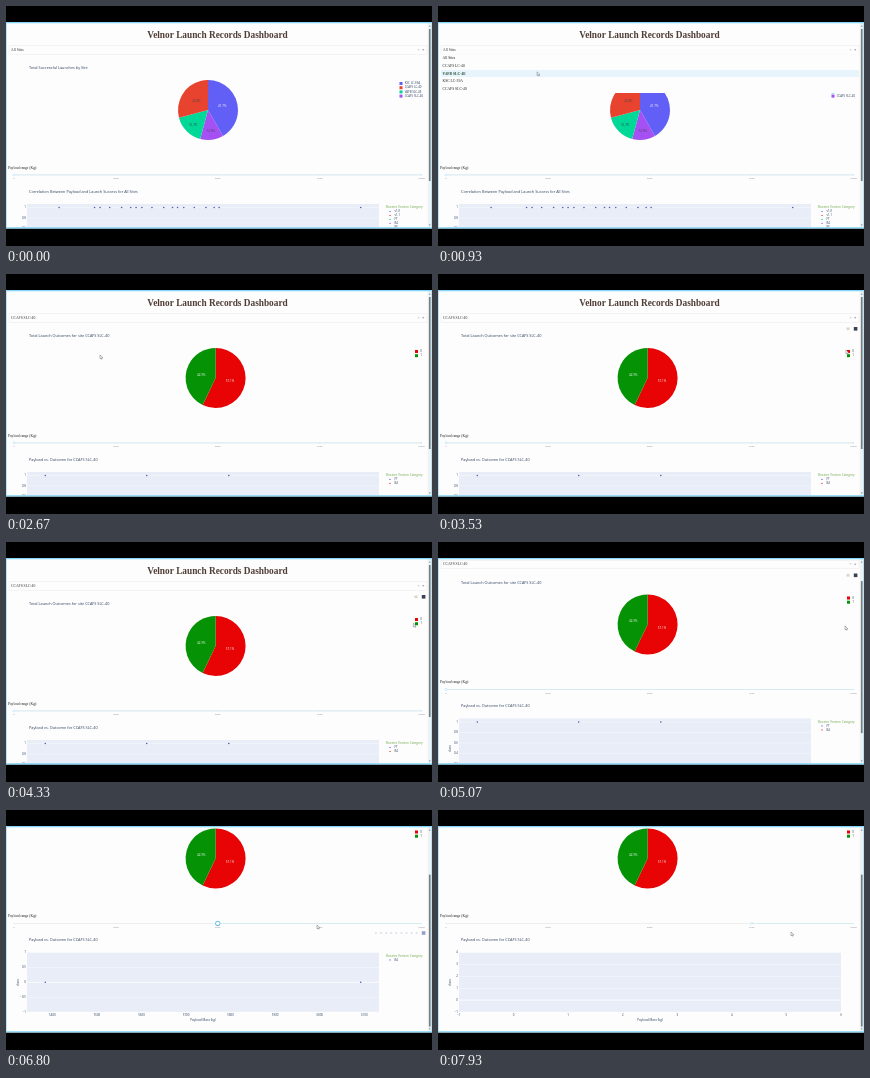
These frames come from a looping animation (426 by 240 pixels, 8 s). An HTML page with a canvas:

```html
<!DOCTYPE html>
<html lang="en">
<head>
<meta charset="utf-8">
<title>Launch Records Dashboard</title>
<style>
html, body { margin: 0; width: 100%; height: 100%; overflow: hidden; background: #000; }
canvas { display: block; width: 100vw; height: 100vh; }
</style>
</head>
<body>
<canvas id="stage"></canvas>
<script>
const W = 426, H = 240, LOOP = 8000;
const canvas = document.getElementById('stage');
const ctx = canvas.getContext('2d');
const SANS = '"Open Sans", sans-serif', SERIF = '"Liberation Serif", serif';
const INK = '#2a3f5f', RED = '#e80404', GREEN = '#059205';
const BLUE = '#625ff6', CORAL = '#e8432f', MINT = '#00d898', PURPLE = '#a450f2';
const PALETTE = [BLUE, CORAL, MINT, PURPLE, '#ffa15a'];
const PLOT = { left: 21, top: 198, bottom: 257.5 };

const SITES = ['All Sites', 'CCAFS LC-40', 'VAFB SLC-4E', 'KSC LC-39A', 'CCAFS SLC-40'];
const BOOSTERS = ['v1.0', 'v1.1', 'FT', 'B4', 'B5'];

// Launches per site: payload, outcome, booster.
const launch = (kg, ok, booster) => ({ kg, ok, booster });
const LAUNCHES = {
  0: [launch(0, 0, 'v1.0'),
    ...Array.from({ length: 16 }, (_, i) => launch(1500 + 255 * i + 90 * Math.sin(i * 5), 1, BOOSTERS[i % 5])),
    launch(420, 1, 'FT'), launch(9600, 1, 'B5')],
  2: [launch(500, 1, 'v1.1'), launch(5000, 0, 'FT'), launch(9600, 1, 'B4')],
  4: [launch(362, 1, 'FT'), launch(2205, 1, 'B4'), launch(2647, 0, 'B4'), launch(3696, 1, 'FT'),
    launch(4230, 0, 'B4'), launch(5384, 0, 'B4'), launch(6092, 0, 'B4')]
};

// Each stop is an arrival time followed by the values reached.
const CURSOR = [
  [0, 230, 62], [500, 118, 45], [950, 100, 68], [1500, 118, 47], [2300, 95, 83], [3200, 409, 78],
  [4500, 408, 86], [5700, 9, 114], [5980, 115, 114], [6480, 212, 115], [6780, 312, 117], [7600, 354, 124]
];
const SCROLL = [[0, 0], [4950, 21.5], [5350, 55.5]];
const MIN_KG = [[0, 0], [5980, 2500], [6480, 5000], [7080, 7500]];

const lastStop = (stops, t) => stops.filter(s => s[0] <= t).pop();

function glide(stops, t, span, col = 1) {
  const from = lastStop(stops, t);
  const to = stops.find(s => s[0] > t);
  if (!to) return from[col];
  const begin = Math.max(from[0], to[0] - span);
  const k = Math.max(0, (t - begin) / (to[0] - begin));
  return from[col] + (to[col] - from[col]) * k * k * (3 - 2 * k);
}

function box(x, y, w, h, color) {
  ctx.fillStyle = color;
  ctx.fillRect(x, y, w, h);
}

function dot(x, y, r, color) {
  ctx.fillStyle = color;
  ctx.beginPath();
  ctx.arc(x, y, r, 0, Math.PI * 2);
  ctx.fill();
}

function triangle(x, y, half, height, color) {
  ctx.fillStyle = color;
  ctx.beginPath();
  ctx.moveTo(x - half, y);
  ctx.lineTo(x + half, y);
  ctx.lineTo(x, y + height);
  ctx.fill();
}

function text(str, x, y, size, { color = INK, font = SANS, align = 'left', weight = '' } = {}) {
  ctx.font = `${weight} ${size}px ${font}`;
  ctx.fillStyle = color;
  ctx.textAlign = align;
  ctx.textBaseline = 'middle';
  ctx.fillText(str, x, y);
}

function pie(cx, cy, r, slices) {
  let a0 = -Math.PI / 2;
  for (const [share, color, ink] of slices) {
    const a1 = a0 + share / 100 * Math.PI * 2;
    ctx.fillStyle = color;
    ctx.beginPath();
    ctx.moveTo(cx, cy);
    ctx.arc(cx, cy, r, a0, a1);
    ctx.fill();
    const mid = (a0 + a1) / 2, d = r * (share < 20 ? 0.7 : 0.49);
    text(share + '%', cx + d * Math.cos(mid), cy + d * Math.sin(mid), 3, { color: ink, align: 'center' });
    a0 = a1;
  }
}

function pieLegend(x, entries) {
  entries.forEach(([name, color], i) => {
    const y = 77.5 + i * 4.2;
    box(x - 1.5, y - 1.5, 3, 3, color);
    text(name, x + 3.7, y, 2.9);
  });
}

function pieChart(site) {
  if (site === 0) {
    text('Total Successful Launches by Site', 23, 62, 3.82);
    pie(202, 104, 30, [[41.7, BLUE, '#fff'], [12.5, PURPLE, '#444'], [16.7, MINT, '#444'], [29.2, CORAL, '#444']]);
    pieLegend(395, [[SITES[3], BLUE], [SITES[1], CORAL], [SITES[2], MINT], [SITES[4], PURPLE]]);
    return;
  }
  const [red, green] = site === 2 ? [60, 40] : [57.1, 42.9];
  text('Total Launch Outcomes for site ' + SITES[site], 23, 62, 3.82);
  pie(209.6, 104, 30, [[red, RED, '#fff'], [green, GREEN, '#fff']]);
  pieLegend(410.5, [['0', RED], ['1', GREEN]]);
}

// Round tick values covering lo..hi with at most `most` intervals.
function ticks(lo, hi, most) {
  const unit = 10 ** Math.floor(Math.log10((hi - lo) / most));
  const step = [1, 2, 5, 10].map(m => m * unit).find(s => (hi - lo) / s <= most);
  const list = [];
  for (let i = Math.ceil(lo / step); i * step <= hi; i++) list.push(+(i * step).toFixed(2));
  return list;
}

function axis(lo, hi, a, b) {
  return { lo, hi, at: v => a + (v - lo) / (hi - lo) * (b - a) };
}

// Pads the data span so its end points sit just inside the plot.
function axesFor(data, right) {
  const { left, top, bottom } = PLOT;
  if (!data.length) return [axis(-1, 6, left, right), axis(-1, 4, bottom, top)];
  const kgs = data.map(d => d.kg), lo = Math.min(...kgs), hi = Math.max(...kgs);
  const padX = (hi - lo) * 0.058;
  const flat = data.every(d => d.ok === data[0].ok);
  const padY = flat ? 1 : 0.067;
  const y0 = flat ? data[0].ok : 0, y1 = flat ? y0 : 1;
  return [axis(lo - padX, hi + padX, left, right), axis(y0 - padY, y1 + padY, bottom, top)];
}

function scatter(data, title) {
  const { left, top, bottom } = PLOT, right = data.length ? 373 : 403;
  const [x, y] = axesFor(data, right);
  const label = v => String(v).replace('-', '\u2212');
  text(title, 23, 185.5, 3.82);
  box(left, top, right - left, bottom - top, '#e8edf8');
  for (const v of ticks(x.lo, x.hi, 8)) text(label(v), x.at(v), 260.3, 2.9, { align: 'center' });
  for (const v of ticks(y.lo, y.hi, 6)) {
    const h = v === 0 ? 0.8 : 0.3;
    box(left, y.at(v) - h / 2, right - left, h, '#fff');
    text(label(v), 20, y.at(v), 2.9, { align: 'right' });
  }
  for (const d of data) dot(x.at(d.kg), y.at(d.ok), 0.8, '#5c55ae');
  text('Payload Mass (kg)', (left + right) / 2, 265.8, 3.1, { align: 'center' });
  ctx.save();
  ctx.translate(12, 228);
  ctx.rotate(-Math.PI / 2);
  text('class', 0, 0, 3.1, { align: 'center' });
  ctx.restore();
  if (data.length) text('Booster Version Category', 380, 201.2, 3.1, { color: '#6ca846' });
  [...new Set(data.map(d => d.booster))].forEach((name, i) => {
    const ly = 205.4 + i * 4;
    dot(384, ly, 0.7, PALETTE[i]);
    text(name, 388.5, ly, 2.9);
  });
}

function slider(kg, active) {
  const toX = v => 8 + v * 0.04075, x = toX(kg);
  text('Payload range (Kg):', 2, 161.7, 3.6, { color: '#222', font: SERIF });
  box(8, 168.5, 408, 0.8, '#ececec');
  box(x, 168.5, 416 - x, 0.8, '#d2ecf8');
  for (let v = 0; v <= 10000; v += 2500) {
    dot(toX(v), 168.9, 0.7, '#dfe9ee');
    text(v, toX(v), 172.5, 2.7, { color: '#777', font: SERIF, align: 'center' });
  }
  dot(x, 168.9, active ? 2.6 : 1.3, active ? '#72bfe5' : '#c5e8f7');
  dot(x, 168.9, active ? 1.7 : 0.7, '#fff');
}

function modebar(y, wide) {
  if (wide) for (let i = 0; i < 9; i++) box(369 + i * 5.1, y - 0.8, 1.8, 1.8, '#dde2ec');
  else box(408.5, y - 1.3, 3, 2.6, '#d9d8c5');
  box(415.8, y - 1.8, 3.6, 3.6, wide ? '#93a0c8' : '#3b4155');
}

function dropdown(site, open, hover) {
  ctx.lineWidth = 0.4;
  ctx.strokeStyle = '#e4e4e4';
  ctx.strokeRect(3, 39.8, 418, 8.4);
  text(SITES[site], 5, 44, 3.7, { color: '#333', font: SERIF });
  text('\u00d7', 412.5, 44, 3.5, { color: '#999', align: 'center' });
  triangle(417.2, 43.3, 1.2, 1.5, '#999');
  if (!open) return;
  box(3, 48.2, 418, 38.8, '#fdfdfd');
  SITES.forEach((name, i) => {
    const y = 52.1 + i * 7.75, on = i === hover;
    if (on) box(3, y - 3.8, 418, 7.2, '#e8f4fb');
    text(name, 4.5, y, 3.7, { color: on ? '#234c38' : '#222', font: SERIF, weight: on ? 'bold' : '' });
  });
}

function pointer(x, y, beam) {
  const path = beam
    ? 'M-1-2h2M0-2v4M-1 2h2'
    : 'M-1-2V1.8L0 1 .7 2.3 1.2 2 .7 .8 1.8 .7Z';
  const shape = new Path2D(path);
  ctx.save();
  ctx.translate(x, y);
  ctx.lineWidth = 0.45;
  ctx.strokeStyle = '#5a6468';
  ctx.fillStyle = '#fff';
  if (!beam) ctx.fill(shape);
  ctx.stroke(shape);
  ctx.restore();
}

function windowFrame(scroll) {
  box(421.8, 17, 3.2, 205, '#f1f1f1');
  box(422.9, 23 + scroll * 0.75, 1.7, 152, '#7d7d7d');
  triangle(423.7, 20.5, 1, -1.3, '#777');
  triangle(423.7, 218.5, 1, 1.3, '#777');
  for (const y of [16, 221.2]) box(0, y, W, 1.3, '#86d6f8');
  for (const x of [0, 425.2]) box(x, 16, 0.8, 206, '#a5dff5');
}

function draw(t) {
  const site = t < 1050 ? 0 : t < 2450 ? 2 : 4;
  const open = (t > 560 && t < 1050) || (t > 1650 && t < 2450);
  const scroll = glide(SCROLL, t, 220);
  const cx = glide(CURSOR, t, 420), cy = glide(CURSOR, t, 420, 2);
  const row = Math.floor((cy - 48.2) / 7.75);
  const minKg = lastStop(MIN_KG, t - 50)?.[1] ?? 0;
  const title = site ? 'Payload vs. Outcome for ' + SITES[site]
    : 'Correlation Between Payload and Launch Success for All Sites';

  box(0, 0, W, H, '#000');
  box(0, 16, W, 206.5, '#fdfdfd');
  ctx.save();
  ctx.beginPath();
  ctx.rect(0, 17, 422, 204.5);
  ctx.clip();
  ctx.translate(0, -scroll);
  text('Velnor Launch Records Dashboard', 211.5, 29.4, 9.3, { color: '#503d36', font: SERIF, align: 'center', weight: 'bold' });
  pieChart(site);
  slider(glide(MIN_KG, t, 220), t > 6250 && t < 7150);
  scatter(LAUNCHES[site].filter(d => d.kg >= minKg), title);
  if (t > 2900 && t < 5450) modebar(54.8, false);
  if (t > 6680 && t < 7000) modebar(178.5, true);
  dropdown(site, open, SITES[row] ? row : site);
  ctx.restore();
  windowFrame(scroll);
  if (t > 250) pointer(cx, cy, cy < 48.2);
}

function resize() {
  const ratio = devicePixelRatio || 1;
  canvas.width = Math.round(innerWidth * ratio);
  canvas.height = Math.round(innerHeight * ratio);
}

function tick() {
  ctx.setTransform(canvas.width / W, 0, 0, canvas.height / H, 0, 0);
  draw((performance.now() - begin) % LOOP);
  requestAnimationFrame(tick);
}

const begin = performance.now();
addEventListener('resize', resize);
resize();
tick();
</script>
</body>
</html>
```
